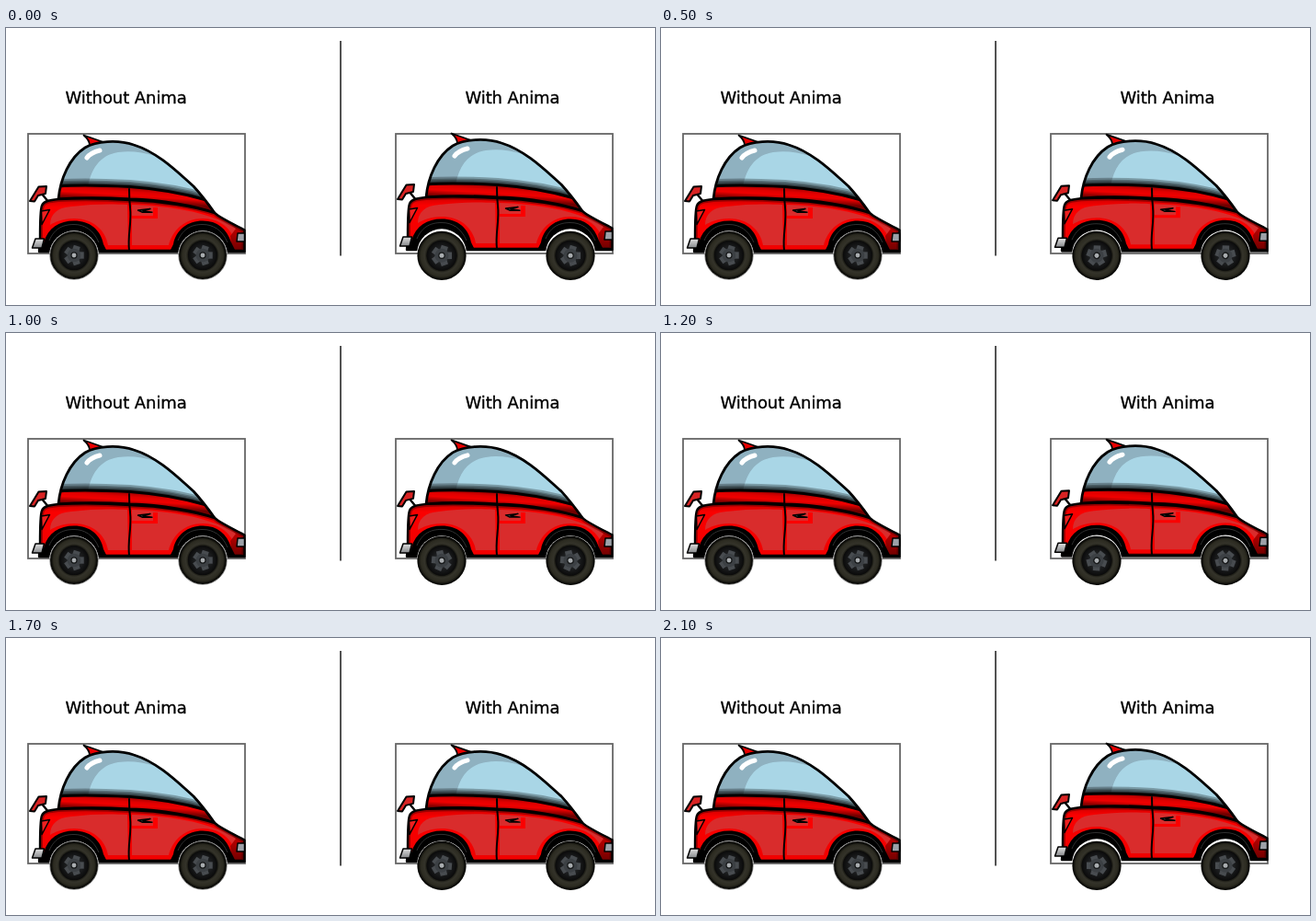
Recreate the animation shown at these times as an HTML page. Size 706 px wide and 301 px high, loop 2200 ms.

```html
<!DOCTYPE html>
<html lang="en">
<head>
<meta charset="utf-8">
<title>Car animation</title>
<style>
html, body { margin: 0; width: 100%; height: 100%; overflow: hidden; background: #fff; }
svg { display: block; }
text { font: 18px "DejaVu Sans", sans-serif; letter-spacing: -.08px; fill: #000; stroke: #000; stroke-width: .35; }
.ink { stroke: #000; stroke-linejoin: round; stroke-linecap: round; }
.line { fill: none; }
</style>
</head>
<body>
<svg width="706" height="301" viewBox="0 0 706 301">
  <defs>
    <linearGradient id="band" x1="130" y1="172" x2="129" y2="188" gradientUnits="userSpaceOnUse">
      <stop offset="0" stop-color="#900000"/>
      <stop offset=".35" stop-color="#e00000"/>
      <stop offset=".6" stop-color="#f00000"/>
      <stop offset="1" stop-color="#700000"/>
    </linearGradient>
    <linearGradient id="paint" x1="0" y1="186" x2="0" y2="244" gradientUnits="userSpaceOnUse">
      <stop offset="0" stop-color="#d00000"/>
      <stop offset=".15" stop-color="#fa0000"/>
      <stop offset="1" stop-color="#f00000"/>
    </linearGradient>
    <linearGradient id="nose" x1="0" y1="214" x2="0" y2="244" gradientUnits="userSpaceOnUse">
      <stop offset="0" stop-color="#c80000"/>
      <stop offset="1" stop-color="#6a0000"/>
    </linearGradient>
    <linearGradient id="metal" x1="0" y1="0" x2="0" y2="1">
      <stop offset="0" stop-color="#e0e0e0"/>
      <stop offset="1" stop-color="#85878a"/>
    </linearGradient>
    <radialGradient id="tyre">
      <stop offset=".6" stop-color="#15150f"/>
      <stop offset=".7" stop-color="#34332a"/>
      <stop offset=".86" stop-color="#2c2b21"/>
      <stop offset=".96" stop-color="#090906"/>
    </radialGradient>
    <radialGradient id="hub">
      <stop offset=".4" stop-color="#222426"/>
      <stop offset="1" stop-color="#0a0a0a"/>
    </radialGradient>

    <path id="roof" d="M57 186C59 164 69 141 86 130C98 123 121 121 139 127C165 135 186 156 204 172Q215 184 227 201C205 193 170 187 135 186C105 184 80 184 57 186Z"/>
    <path id="belt" d="M57 172C80 170 108 171 135 172.500C168 175 195 180 218 187"/>
    <path id="shell" d="M57 186C47 187 41 188 39 193C37 198 37 215 37 228L36 243H259.500V219.500C250 214 235 208 227 201C205 194 170 188 135 187C105 185 80 185 57 186Z"/>
    <clipPath id="dome"><use href="#roof"/></clipPath>
    <clipPath id="hull"><use href="#shell"/></clipPath>

    <g id="body">
      <path class="ink" fill="#e80000" stroke-width="1.800" d="M84.500 116.500L106 124L91 127.500Q91 122 84.500 116.500Z"/>
      <path class="ink line" stroke-width="2.400" d="M38 179L47 190L43 193"/>
      <path class="ink" fill="#d82323" stroke-width="2" d="M26 188L35.500 172.500L44 172L43 180L35 182L31 188.500Z"/>

      <g clip-path="url(#dome)">
        <path fill="#a9d6e6" d="M50 118H230V208H50Z"/>
        <path fill="#8fb1c0" d="M50 185V118H150L162 139C148 135 136 133 122 135C103 138 91 152 88 180Z"/>
        <g class="line" stroke="#000" stroke-opacity=".28">
          <use href="#belt" stroke-width="15"/>
          <use href="#belt" stroke-width="11"/>
          <use href="#belt" stroke-width="8"/>
          <use href="#belt" stroke-width="5"/>
        </g>
        <path fill="url(#band)" d="M50 172C80 171 108 171 135 172.500C168 175 195 180 218 187L230 206H50Z"/>
        <use href="#belt" class="ink line" stroke-width="3"/>
      </g>
      <path fill="none" stroke="#fff" stroke-width="5" stroke-linecap="round" d="M88 141Q92 135.500 102 133"/>
      <use href="#roof" class="ink line" stroke-width="2.800"/>

      <use href="#shell" fill="url(#paint)"/>
      <g clip-path="url(#hull)">
        <path fill="#d92c2c" d="M48 214C48 202 56 195 71 194C94 191 115 191 132 192L133 236H111C108 219 94 207 74 207C61 207 53 211 48 214Z"/>
        <path fill="#d92c2c" d="M137 192C172 193 207 199 225 206C237 210 246 214 252 219L247 226C240 213 228 207 214 207C194 207 181 220 177 236H137Z"/>
        <path fill="url(#nose)" d="M226 199L262 217V244H246L244 226L250 218Z"/>
        <use href="#shell" class="line" stroke="#000" stroke-opacity=".3" stroke-width="6"/>
      </g>
      <use href="#shell" class="ink line" stroke-width="2.400"/>
      <path class="ink line" stroke-width="2" d="M134 175Q134 186 135 195C137 213 132 224 134 242"/>
      <path fill="#fa0000" d="M160 195H165V207H137V204H160Z"/>
      <path class="ink" fill="#444" stroke-width="1.400" d="M143.500 198L157 196.500L149 198.800L159 200.200L148 200.200Z"/>
      <path class="ink" fill="#ef2020" stroke-width="1.500" d="M38.500 199L47.500 197.500L39 213.500Z"/>

      <path d="M36 244V238L41 233C46 217 58 209.500 74 209.500C91 209.500 103 219 106 235L109 241H179L182 235C185 219 198 209.500 214 209.500C230 209.500 240 218 245 233L249 241H260V244Z"/>
      <g fill="none" stroke="#303030" stroke-width="1">
        <path d="M47 231C53 217 63 213.500 74 213.500S95 219 101 233"/>
        <path d="M187 231C193 217 203 213.500 214 213.500S235 219 241 233"/>
      </g>
      <g fill="#fff">
        <path d="M47.100 245A27 27 0 0 1 100.900 245Z"/>
        <path d="M187.100 245A27 27 0 0 1 240.900 245Z"/>
      </g>
      <path class="ink" fill="url(#metal)" stroke-width="1.500" d="M32 229H41.500L39 239H28.500Z"/>
      <path class="ink" fill="#9da1a8" stroke-width="1.500" d="M252 223H259.500V232H251Z"/>
    </g>

    <g id="wheel">
      <circle r="26.600" fill="url(#tyre)"/>
      <circle r="16.500" fill="url(#hub)"/>
      <g id="spokes" stroke="#484c50" stroke-width="7.500"></g>
      <circle r="7.500" fill="#3c4044"/>
      <circle r="3.800" fill="#17191a"/>
      <circle r="2.500" fill="#a9adb0"/>
    </g>
  </defs>

  <rect width="706" height="301" fill="#fff"/>
  <path d="M364 14V247.500" stroke="#333" stroke-width="1.700"/>
  <text x="64.400" y="82">Without Anima</text>
  <text x="499.400" y="82">With Anima</text>
  <g fill="none" stroke="#666" stroke-width="1.800">
    <rect x="24" y="115" width="236" height="130"/>
    <rect x="424" y="115" width="236" height="130"/>
  </g>

  <use href="#body"/>
  <g fill="none" stroke="#8a8a8a" stroke-width="1">
    <circle cx="74" cy="247" r="26.200"/>
    <circle cx="214" cy="247" r="26.200"/>
  </g>
  <use href="#wheel" transform="translate(74 247) scale(.975)"/>
  <use href="#wheel" transform="translate(214 247) scale(.975)"/>

  <use href="#body" id="moving"/>
  <use href="#wheel" class="spin" data-x="474"/>
  <use href="#wheel" class="spin" data-x="614"/>
</svg>
<script>
const STEP = 100, STEPS = 22, BOUNCE = 700, TURN = 2 * BOUNCE;
const spokes = document.getElementById("spokes");
for (let i = 0; i < 5; i++) {
  const spoke = document.createElementNS("http://www.w3.org/2000/svg", "path");
  spoke.setAttribute("d", "M0 0V-11");
  spoke.setAttribute("transform", `rotate(${i * 72 + 18})`);
  spokes.append(spoke);
}

const car = document.getElementById("moving");
const wheels = document.querySelectorAll(".spin");

function draw(now) {
  const time = Math.floor(now / STEP) % STEPS * STEP;
  const lift = 1 + Math.cos(time / BOUNCE * 2 * Math.PI);
  car.setAttribute("transform", `translate(400 ${-lift})`);
  for (const wheel of wheels) {
    wheel.setAttribute("transform",
      `translate(${wheel.dataset.x} 247.300) rotate(${time / TURN * 360})`);
  }
}

const start = performance.now();
function tick() {
  draw(performance.now() - start);
  requestAnimationFrame(tick);
}
draw(0);
requestAnimationFrame(tick);
</script>
</body>
</html>
```
